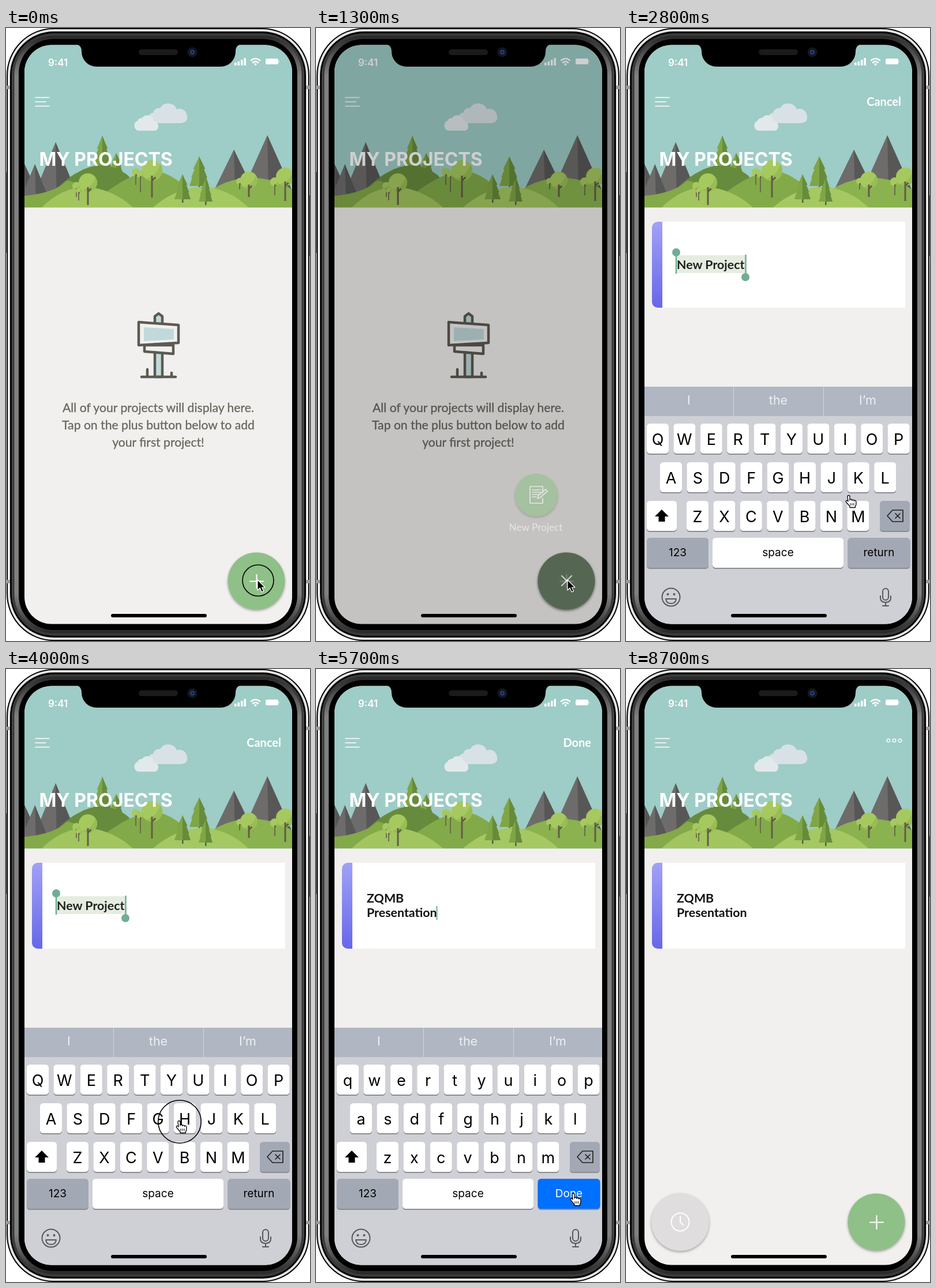
Recreate the animation shown at these times as an HTML page. Size 527 by 1063 pixels, loop 8800 ms.

```html
<!DOCTYPE html>
<html lang="en">
<head>
<meta charset="utf-8">
<title>My projects</title>
<style>
  html, body { margin: 0; height: 100%; overflow: hidden; background: #fff; }
  svg { display: block; width: 100vw; height: 100vh; }
  text { font-family: Inter, Roboto, sans-serif; }
  .lato { font-family: Lato, "Open Sans", sans-serif; }
  .bold { font-weight: 700; }
  .mid { text-anchor: middle; }
  .line { fill: none; stroke: #fff; stroke-linecap: round; stroke-linejoin: round; }
  .drop { filter: drop-shadow(0 2px 2px #0005); }
</style>
</head>
<body>
<svg viewBox="0 0 527 1063" preserveAspectRatio="none">
  <defs>
    <clipPath id="screen"><rect x="32" y="29.500" width="464" height="1004" rx="47"/></clipPath>
    <clipPath id="head"><path d="M32 29h464v282.500H32z"/></clipPath>
    <linearGradient id="purple" x2="0" y2="1"><stop stop-color="#a1a1f7"/><stop offset="1" stop-color="#6767ea"/></linearGradient>
    <linearGradient id="steel" x2="0" y2="1">
      <stop stop-color="#222"/><stop offset=".07" stop-color="#808080"/>
      <stop offset=".93" stop-color="#808080"/><stop offset="1" stop-color="#222"/>
    </linearGradient>
  </defs>

  <!-- phone body -->
  <path d="M.5 250V390M526.5 290V395" stroke="#888"/>
  <rect x="2" y="1" width="523" height="1061" rx="81" fill="#e4e4e4" stroke="#000" stroke-width="2"/>
  <path d="M0 103h7M0 960h7M520 103h7M520 960h7" stroke="#999" stroke-width="6"/>
  <rect x="7" y="6" width="513" height="1051" rx="76"/>
  <rect x="10" y="9" width="507" height="1045" rx="73" fill="url(#steel)"/>
  <rect x="12.500" y="11.500" width="502" height="1040" rx="70" fill="none" stroke="#3a3a3a" stroke-width="4"/>
  <rect x="22" y="19" width="483" height="1025" rx="60"/>

  <g clip-path="url(#screen)">
    <path d="M32 29h464v1005H32z" fill="#f2f0ee"/>
    <g clip-path="url(#head)">
      <path d="M32 29h464v283H32z" fill="#9eccc6"/>
      <g fill="#d8e1e6">
        <path d="M256 165a9 9 0 0 1-1-18 10 10 0 0 1 12-8 16 16 0 0 1 29 2 13 13 0 0 1 17 8q5 14-9 16z"/>
        <path d="M229 178a9 9 0 0 1-1-17 8 8 0 0 1 8-5 11 11 0 0 1 20 5 9 9 0 0 1 3 17z" fill="#e2e9eb"/>
      </g>
      <g id="scene"></g>
      <text x="57.500" y="239" font-size="32" class="bold" fill="#fff">MY PROJECTS</text>
    </g>
    <text x="73" y="66" font-size="17" font-weight="600" fill="#fff">9:41</text>
    <g fill="#fff">
      <path d="M396 60h3.500v5H396zM401.500 58h3.500v7h-3.500zM407 55h3.500v10H407zM412.500 52h3.500v13h-3.500z"/>
      <rect x="450" y="53" width="22" height="10" rx="2.500"/><path d="M473 56q2 2 0 4z"/>
    </g>
    <path d="M425 56q7.500-6 15 0M428 60q4.500-4 9 0" class="line" stroke-width="2.600"/><circle cx="432.500" cy="63" r="2" fill="#fff"/>
    <path d="M51 120.500h24M51 128h18M51 135.500h24" class="line" stroke-width="1.700"/>

    <g id="empty">
      <g fill="#f2f0ee" stroke="#5b5b53" stroke-width="4.500" stroke-linejoin="round" stroke-linecap="round">
        <path d="M258 605V500l6.500-5 6.500 5v105z" fill="#c1d9da"/>
        <path d="M240 550h50v15l-50-4z"/>
        <path d="M230 510l69 5v31l-69 4z"/>
        <path d="M235 605h59M245 592v13M287 598v7"/>
      </g>
      <path d="M239 519l52 3v18l-52 3z" fill="#c1d9da"/>
      <g font-size="21.150" class="lato mid" fill="#6b6861" stroke="#6b6861" stroke-width=".35" id="hint"></g>
    </g>

    <g id="card">
      <path d="M63 336h421v149H63z" fill="#fff"/>
      <path d="M63 336H55a10 10 0 0 0-10 10v129a10 10 0 0 0 10 10h8z" fill="url(#purple)"/>
      <g id="select">
        <path d="M87 394h120v31H87z" fill="#e5ede1"/>
        <path d="M87 389v37M207.500 393v39" stroke="#70ad94" stroke-width="2.500"/>
        <circle cx="87" cy="389" r="7" fill="#70ad94"/><circle cx="207" cy="432" r="7" fill="#70ad94"/>
        <text x="88" y="418" font-size="21.400" class="lato bold" fill="#222">New Project</text>
      </g>
      <g id="named" font-size="21.400" class="bold" fill="#111">
        <text class="lato" x="88" y="405">ZQMB</text><text class="lato" x="88" y="430">Presentation</text>
      </g>
      <path id="caret" d="M209.500 411v24" stroke="#70ad94" stroke-width="2"/>
    </g>
    <text id="action" x="477" y="135" font-size="20" text-anchor="end" class="lato bold" fill="#fff"></text>
    <g id="dots" class="line" stroke-width="1.400"><circle cx="455" cy="124" r="2.800"/><circle cx="465" cy="124" r="2.800"/><circle cx="475" cy="124" r="2.800"/></g>

    <g id="keyboard">
      <path d="M32 622h464v412H32z" fill="#cfd0d6"/>
      <path d="M32 622h464v51H32z" fill="#b0b6c2"/>
      <path d="M186.500 622v51M342.500 622v51" stroke="#d3d6dc"/>
      <g font-size="21.500" class="mid" fill="#eef0f3"><text x="109" y="653">I</text><text x="264" y="653">the</text><text x="419" y="653">I’m</text></g>
      <g id="keys"></g>
      <path d="M62 835l12 12h-6.500v9h-11v-9H50z"/>
      <path d="M462 836h18v20h-18l-9-10zM467 842l8 8M475 842l-8 8" class="line" style="stroke:#222" stroke-width="1.700"/>
      <g class="line" style="stroke:#55585e" stroke-width="2">
        <circle cx="78" cy="987" r="15.500"/><path d="M69 990h18q-1 8-9 8t-9-8z"/>
        <rect x="445" y="972" width="10" height="20" rx="5"/><path d="M441 985v3q0 8 9 8t9-8v-3M450 996v6M445 1002h10"/>
      </g>
      <g fill="#55585e"><circle cx="72.500" cy="982" r="2"/><circle cx="83.500" cy="982" r="2"/></g>
    </g>

    <g id="add">
      <circle cx="434" cy="959" r="49.500" fill="#8fc088" class="drop"/>
      <path d="M423 959.500h23M434.500 948v23" class="line" stroke-width="2.200"/>
    </g>
    <path id="shade" d="M32 29h464v1005H32z"/>
    <g id="menu">
      <circle cx="382" cy="810" r="37" fill="#8fc088" class="drop"/>
      <path d="M393 806v-11h-22v29h22v-8M375 801h14M375 805h14M375 809h11M375 813h7M384 816l2-6 12-10 3 3-12 11z" class="line" stroke-width="1.700"/>
      <text x="381" y="872" font-size="17.200" class="lato mid" fill="#fff">New Project</text>
    </g>
    <g id="clock">
      <circle cx="94" cy="959" r="50" fill="#dfdddd" class="drop"/>
      <g class="line" stroke-width="2"><circle cx="94" cy="959" r="15.500"/><path d="M94 949v10l5 5"/></g>
    </g>
    <g id="close">
      <circle cx="434" cy="959" r="49.500" fill="#404040" class="drop"/>
      <path d="M426 950l17 17M443 950l-17 17" class="line" stroke-width="2.200"/>
    </g>
    <rect x="182" y="1016" width="166" height="6" rx="3"/>
  </g>

  <!-- notch -->
  <path d="M120 28q11 1 11 13a26 26 0 0 0 26 26h215a26 26 0 0 0 26-26q0-12 11-13z"/>
  <rect x="230" y="37" width="68" height="10" rx="5" fill="#1b1b1d"/>
  <circle cx="323" cy="42" r="8.500" fill="#15171f"/><circle cx="323" cy="42" r="4" fill="#233c80"/><circle cx="323" cy="42" r="1.500" fill="#0a1026"/>

  <circle id="ring" fill="none" stroke="#000" stroke-width="1.600"/>
  <g id="cursor" stroke-linejoin="round">
    <path id="arrow" d="M0 0v18l4.200-4 3 7 3.300-1.400-3-6.600H13z" fill="#000" stroke="#fff" stroke-width="1.200"/>
    <g id="hand" stroke="#000" stroke-width="1.300">
      <path d="M-2 1.500q0-2 2-2t2 2V8q0-2 2-1.700t1.800 2q.2-1.500 2-1.200t1.700 2q.3-1.200 1.900-.8t1.500 2.200v4q0 2-1.500 4v2H2v-2l-6-7q-1.500-2 0-3t3 1.500z" fill="#fff"/>
      <path d="M3 13v4M6 13v4M9 13v4" stroke-width="1"/>
    </g>
  </g>
</svg>
<script>
const $ = id => document.getElementById(id);
const put = (id, html) => $(id).insertAdjacentHTML('beforeend', html);

// Landscape
const poly = (d, fill) => put('scene', `<path d="${d}" fill="${fill}"/>`);
function peak(x, y, w, base) {
  poly(`M${x} ${y}L${x - w} ${base}H${x + w}z`, '#6d6c6b');
  poly(`M${x} ${y}L${x + 2} ${base}H${x + w}z`, '#585757');
}
function pine(x, y, w, base) {
  const h = base - y;
  poly(`M${x - 1} ${base - 4}h2.500v10h-2.500z`, '#5e5b45');
  for (const k of [1, .72, .42]) {
    const b = y + h * k, s = w * (.35 + .65 * k);
    poly(`M${x} ${y}L${x - s} ${b}H${x}z`, '#7fa545');
    poly(`M${x} ${y}L${x + s} ${b}H${x}z`, '#668c3b');
  }
}
function tree(x, y, r, base) {
  put('scene', `<circle cx="${x}" cy="${y}" r="${r}" fill="#a6c95f"/>
    <path d="M${x - r * .6} ${y + r * .8}A${r} ${r} 0 0 0 ${x + r * .8} ${y - r * .6}Q${x + r * .5} ${y + r * .5} ${x - r * .6} ${y + r * .8}" fill="#97bd54"/>
    <path d="M${x} ${y + r * .5}V${base}M${x} ${y + r}l${r * .35} ${-r * .35}" fill="none" stroke="#635c48" stroke-width="${r > 10 ? 3 : 1.6}"/>`);
}
peak(32, 236, 25, 290); peak(86, 198, 42, 300); peak(50, 236, 26, 300);
peak(395, 211, 36, 285); peak(453, 186, 42, 280);
pine(167, 187, 15, 240); pine(191, 217, 11, 250);
poly('M60 311Q95 265 125 250Q170 224 212 256L250 311z', '#678b3c');
poly('M32 311V291Q85 286 105 265Q125 262 150 311z', '#83a948');
poly('M140 311Q215 247 257 248Q295 250 345 311z', '#83aa49');
poly('M320 311Q365 262 424 259Q470 262 496 280V311z', '#8ab24e');
pine(335, 223, 17, 274);
tree(225, 250, 7, 272); tree(233, 254, 6, 285); tree(253, 247, 18, 294);
tree(405, 266, 6, 280); tree(421, 264, 15, 293);
tree(466, 267, 8, 290); tree(484, 258, 16, 300);
poly('M62 311Q95 278 137 275Q185 279 220 311z', '#a2c55f');
poly('M255 311Q295 276 345 275Q390 281 420 311z', '#a5c863');
tree(122, 274, 7, 293); tree(126, 282, 5, 299); tree(142, 268, 16, 307);
pine(306, 254, 14, 297); pine(346, 262, 12, 301);

['All of your projects will display here.', 'Tap on the plus button below to add', 'your first project!']
  .forEach((s, i) => put('hint', `<text class="lato" x="264" y="${666 + 30 * i}">${s}</text>`));

// Keyboard
function key(x, y, w, label = '', size = 27, fill = '#fff', id = '') {
  put('keys', `<rect x="${x}" y="${y + 2}" width="${w}" height="52" rx="5.500" fill="#8b8d93"/>
    <rect x="${x}" y="${y}" width="${w}" height="52" rx="5.500" fill="${fill}" ${id && `id="${id}"`}/>
    <text class="mid${size > 20 ? ' letter' : ''}" x="${x + w / 2}" y="${y + (size > 20 ? 37 : 32)}" font-size="${size}" ${id && `id="${id}Label"`}>${label}</text>`);
}
[['QWERTYUIOP', 36], ['ASDFGHJKL', 59], ['ZXCVBNM', 105]].forEach(([row, x], r) =>
  [...row].forEach((c, i) => key(x + 46.4 * i, 686 + 67 * r, 38, c)));
key(36, 820, 52); key(440, 820, 52, '', 19, '#a3a9b4');
key(36, 884, 107, '123', 19, '#a3a9b4');
key(150, 884, 227, 'space', 19);
key(384.5, 884, 108, 'return', 19, '#a3a9b4', 'enter');
const letters = [...document.querySelectorAll('.letter')];

// Timeline in ms
const LOOP = 8800, EDIT = 2800, TYPED = 4250, SAVED = 6150, GONE = 6400;
const path = [[0, 436, 957], [1400, 436, 957], [1900, 399, 855], [2250, 386, 811], [3100, 386, 811],
  [3750, 300, 784], [4500, 300, 784], [5500, 446, 910], [LOOP, 446, 910]];
const clicks = [-100, 2450, 3840, 5900];
const clamp = v => Math.min(1, Math.max(0, v));
const show = (id, on) => $(id).setAttribute('opacity', +on);

function cursorAt(t) {
  const i = path.findIndex(p => p[0] > t), [t0, x0, y0] = path[i - 1], [t1, x1, y1] = path[i];
  const k = (t - t0) / (t1 - t0), e = k * k * (3 - 2 * k);
  return [x0 + (x1 - x0) * e, y0 + (y1 - y0) * e];
}

function draw(t) {
  const start = t < EDIT, editing = t >= EDIT && t < SAVED, typed = t >= TYPED, saved = t >= SAVED;
  const fade = start ? clamp((t - 1100) / 350) : 0;
  show('empty', start);
  show('card', !start);
  show('select', !typed);
  show('named', typed);
  show('caret', typed && !saved);
  show('keyboard', editing);
  show('dots', saved);
  show('clock', saved);
  show('add', !editing);
  show('shade', .33 * fade);
  show('menu', fade);
  show('close', fade);
  $('action').textContent = editing ? (typed ? 'Done' : 'Cancel') : '';
  letters.forEach(l => l.textContent = typed ? l.textContent.toLowerCase() : l.textContent.toUpperCase());
  $('enter').setAttribute('fill', typed ? '#0070ff' : '#a3a9b4');
  $('enterLabel').textContent = typed ? 'Done' : 'return';
  $('enterLabel').setAttribute('fill', typed ? '#fff' : '#000');

  const [x, y] = cursorAt(t);
  $('cursor').setAttribute('transform', `translate(${x} ${y})`);
  show('cursor', t < GONE);
  show('arrow', t < 1500);
  show('hand', t >= 1500);
  const age = t - clicks.findLast(c => c <= t);
  $('ring').setAttribute('cx', x + 1);
  $('ring').setAttribute('cy', y + 1);
  $('ring').setAttribute('r', 10 + .17 * Math.min(age, 250));
  show('ring', age < 250);
}

let begin;
function tick(now) {
  begin ??= now;
  draw((now - begin) % LOOP);
  requestAnimationFrame(tick);
}
draw(0);
requestAnimationFrame(tick);
</script>
</body>
</html>
```
